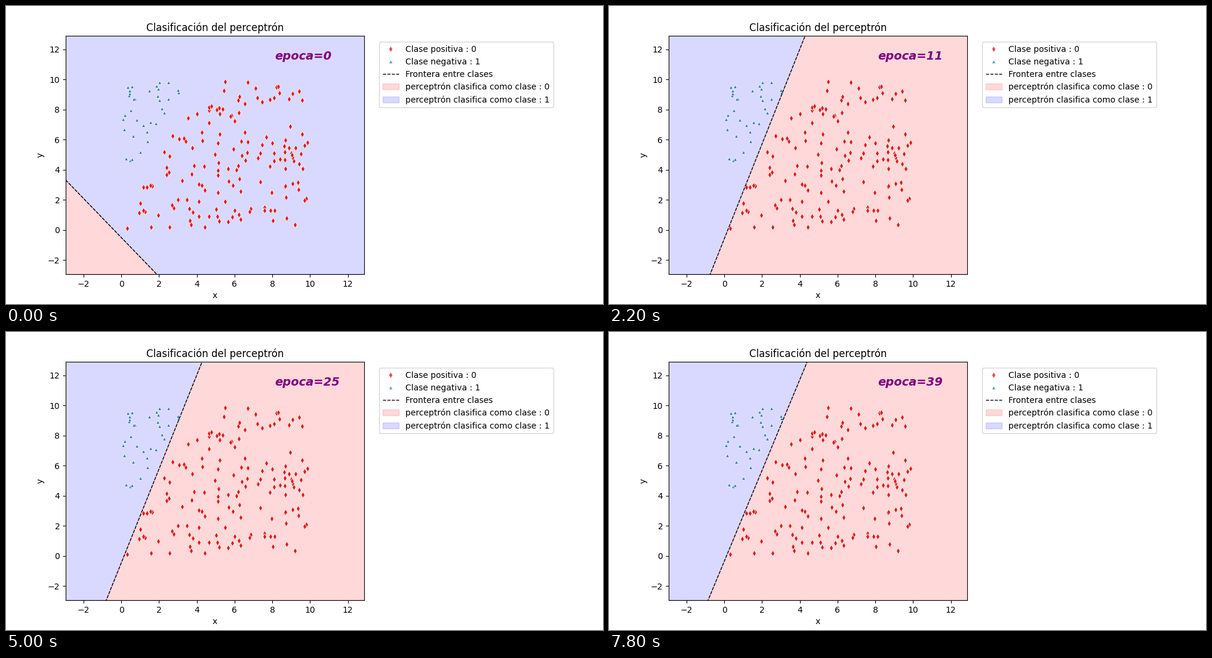
Write a matplotlib script that moves like this. It is 1000 px wide and 500 px high and loops after 8000 ms.

```python
import numpy as np
import matplotlib.pyplot as plt
from matplotlib.animation import FuncAnimation
from matplotlib.lines import Line2D
from matplotlib.patches import Patch, Polygon

EPOCHS = 40
FLIP_EPOCH = 5  # from here on class 0 lies to the right of the boundary
XLIM = (-2.95, 12.87)
YLIM = (-2.94, 12.90)
LEFT, RIGHT, TOP, BOTTOM = 100, 600, 50, 450
RED, BLUE = "#e41a1c", "#377eb8"
MARKER = dict(ms=5, mec="white", mew=0.5)

# Epoch, then the stage x where the boundary crosses the top and the bottom.
KEYS = np.array([
    (0, -133.6, 252.5), (4, 152, 208), (5, 306.5, 175),
    (11, 328.5, 169.5), (29, 328.5, 167.5), (39, 332, 166),
])

plt.rcParams["font.family"] = "DejaVu Sans"


def to_data(points):
    """Convert stage pixels (y downwards) to axis units."""
    x, y = np.asarray(points, float).T
    return np.column_stack([
        XLIM[0] + (x - LEFT) / (RIGHT - LEFT) * (XLIM[1] - XLIM[0]),
        YLIM[0] + (BOTTOM - y) / (BOTTOM - TOP) * (YLIM[1] - YLIM[0]),
    ])


def make_classes():
    """Uniform points, split by slope 2 with an empty band in between."""
    rng = np.random.default_rng(7)
    x, y = rng.uniform(0.05, 9.9, (2, 1000))
    below = y < 2 * x + 0.8
    above = y > 2 * x + 3
    return [(x[m][:n], y[m][:n]) for m, n in ((below, 151), (above, 34))]


fig = plt.figure(figsize=(10, 5), dpi=100, facecolor="white")
ax = fig.add_axes([0.1, 0.1, 0.5, 0.8])
ax.set(xlim=XLIM, ylim=YLIM, xlabel="x", ylabel="y",
       xticks=range(-2, 13, 2), yticks=range(-2, 13, 2))
ax.set_title("Clasificación del perceptrón")

positive, negative = make_classes()
ax.plot(*positive, "d", color=RED, zorder=1.5, **MARKER)
ax.plot(*negative, "^", color=BLUE, zorder=1.5, **MARKER)

regions = [ax.add_patch(Polygon([(0, 0), (1, 0), (1, 1)], color=c, lw=1,
                                alpha=0.15, zorder=1))
           for c in ("red", "blue")]
border, = ax.plot([], [], "k--", lw=1, zorder=2)
label = ax.text(0.7, 0.9, "", transform=ax.transAxes, color="purple",
                fontsize=14, fontweight="bold", style="italic")


def marker_key(marker, color, text):
    return Line2D([], [], ls="", marker=marker, color=color, alpha=0.8,
                  label=text, **MARKER)


def region_key(color, number):
    return Patch(color=color, alpha=0.15, lw=1,
                 label=f"perceptrón clasifica como clase : {number}")


ax.legend(handles=[
    marker_key("d", RED, "Clase positiva : 0"),
    marker_key("^", BLUE, "Clase negativa : 1"),
    Line2D([], [], color="k", ls="--", lw=1, label="Frontera entre clases"),
    region_key("red", 0),
    region_key("blue", 1),
], loc="upper left", bbox_to_anchor=(1.05, 0.9745), borderaxespad=0)


def draw(epoch):
    top, bottom = (np.interp(epoch, KEYS[:, 0], KEYS[:, i]) for i in (1, 2))

    # The line spans the full x range; the axes clip it.
    x = np.array([LEFT, RIGHT])
    y = TOP + (x - top) / (bottom - top) * (BOTTOM - TOP)
    border.set_data(*to_data(np.column_stack([x, y])).T)

    sides = (-400, 1000) if epoch < FLIP_EPOCH else (1000, -400)
    for region, side in zip(regions, sides):
        region.set_xy(to_data([(side, TOP), (top, TOP),
                               (bottom, BOTTOM), (side, BOTTOM)]))
    label.set_text(f"epoca={epoch}")
    return [*regions, border, label]


anim = FuncAnimation(fig, draw, frames=EPOCHS, interval=200, repeat=True)
plt.show()
```
